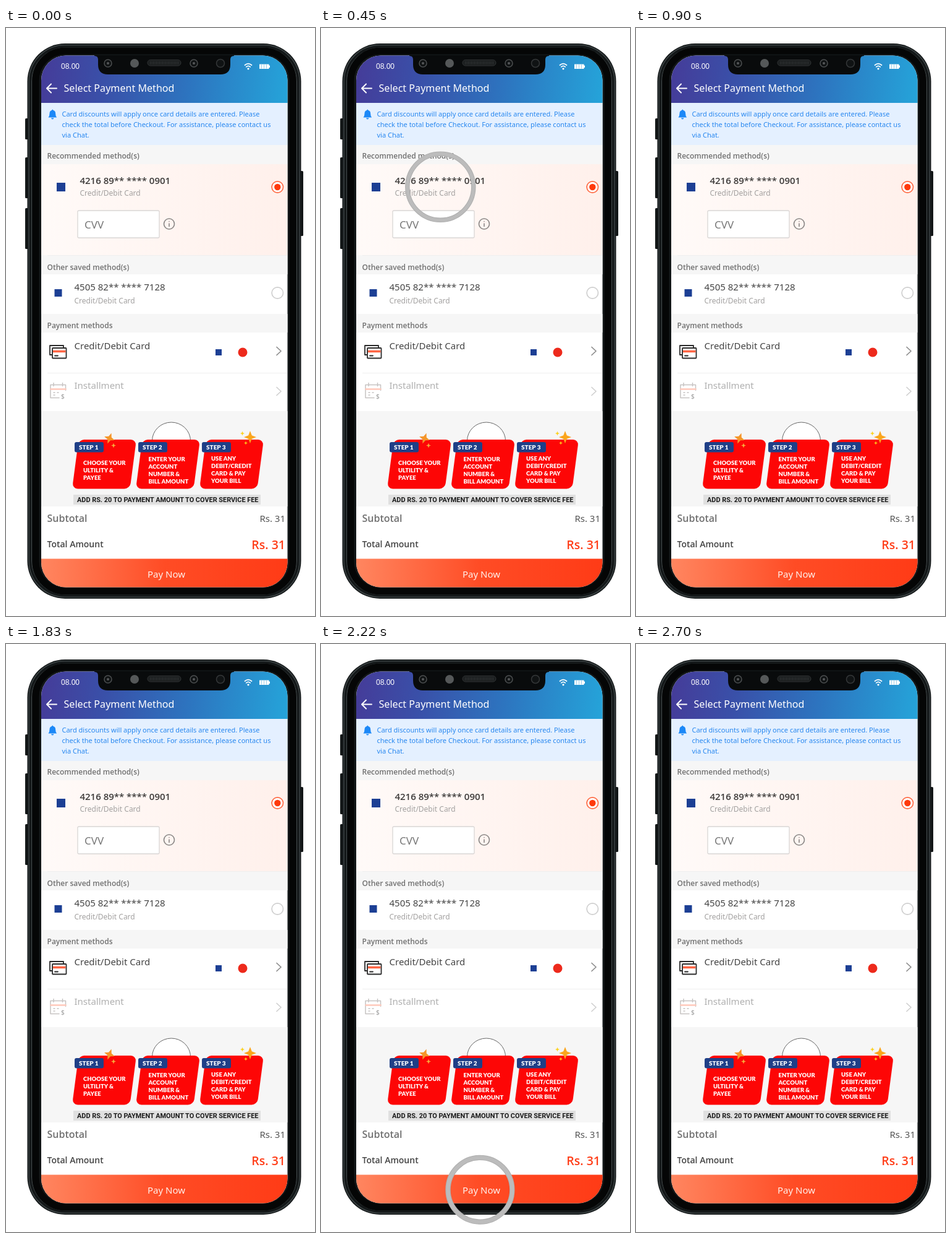
An HTML page that plays this animation: 500x950 px, repeating every 3030 ms.

```html
<!DOCTYPE html>
<html lang="en">
<head>
<meta charset="utf-8">
<title>Select payment method</title>
<style>
  html, body { margin: 0; width: 100%; height: 100%; overflow: hidden; background: #fff; }
  svg { display: block; width: 100%; height: 100%; }
  text { font-family: "Noto Sans", "Open Sans", sans-serif; white-space: pre; }
  .semi { font-family: "Open Sans", "Noto Sans", sans-serif; font-weight: 600; }
  .promo { font-family: Lato, "Open Sans", sans-serif; font-weight: 900; }
  .bar { font-family: Roboto, Lato, sans-serif; font-weight: 700; }
  .clock { font-family: "Liberation Sans", Arial, sans-serif; }
  .end { text-anchor: end; }
  .line { fill: none; stroke-linecap: round; stroke-linejoin: round; }
</style>
</head>
<body>
<svg viewBox="0 0 500 950" xmlns="http://www.w3.org/2000/svg">
  <defs>
    <clipPath id="screen"><rect x="57" y="44.500" width="398.500" height="859" rx="40"/></clipPath>
    <linearGradient id="head" gradientUnits="userSpaceOnUse" x1="57" y1="60" x2="455" y2="105">
      <stop offset="0" stop-color="#453c99"/>
      <stop offset=".25" stop-color="#3a4fa8"/>
      <stop offset=".6" stop-color="#2d74bf"/>
      <stop offset="1" stop-color="#25a3d9"/>
    </linearGradient>
    <linearGradient id="blush">
      <stop offset="0" stop-color="#fffaf8"/>
      <stop offset="1" stop-color="#fff0eb"/>
    </linearGradient>
    <linearGradient id="pay">
      <stop offset="0" stop-color="#ff8660"/>
      <stop offset=".5" stop-color="#ff4c25"/>
      <stop offset="1" stop-color="#ff3b16"/>
    </linearGradient>
  </defs>

  <!-- phone body -->
  <g fill="#131718">
    <rect x="31" y="146" width="6" height="34" rx="1.5"/>
    <rect x="31" y="209" width="6" height="66" rx="1.5"/>
    <rect x="31" y="291" width="6" height="66" rx="1.5"/>
    <rect x="474" y="231" width="7" height="105" rx="1.5"/>
    <rect x="34.500" y="25" width="443" height="897" rx="61"/>
  </g>
  <g fill="none">
    <rect x="37" y="27.500" width="438" height="892" rx="58.500" stroke="#3c4344" stroke-width="1.500"/>
    <rect x="41.500" y="32" width="429" height="883" rx="54" stroke="#434a4b"/>
    <rect x="48" y="37" width="416" height="873" rx="48" stroke="#050606" stroke-width="11"/>
  </g>

  <!-- app screen -->
  <g clip-path="url(#screen)">
    <rect x="57" y="44" width="399" height="860" fill="#fff"/>
    <rect x="57" y="44" width="399" height="77" fill="url(#head)"/>
    <rect x="57" y="121" width="399" height="68" fill="#e4f0ff"/>
    <g fill="#f6f6f6">
      <rect x="57" y="189" width="399" height="31"/>
      <rect x="57" y="367" width="399" height="31"/>
      <rect x="57" y="462" width="399" height="30"/>
      <rect x="57" y="619" width="399" height="154"/>
    </g>
    <rect x="57" y="220" width="399" height="147" fill="url(#blush)"/>
    <path d="M67 367.500H455M67 557.500H455" stroke="#efefef"/>
    <rect x="57" y="857.500" width="399" height="46.500" fill="url(#pay)"/>
  </g>

  <!-- notch -->
  <path d="M143 44v1q6 0 6 6v8q0 16 16 16h182q16 0 16-16v-8q0-6 6-6v-1z" fill="#090b0c"/>
  <g fill="#101314" stroke="#4c4f50" stroke-width="1.500">
    <circle cx="165" cy="57" r="6"/>
    <circle cx="304" cy="57" r="6"/>
    <circle cx="347" cy="57" r="6.500" stroke="#343738"/>
  </g>
  <g fill="#555859">
    <circle cx="165" cy="57" r="2"/>
    <circle cx="304" cy="57" r="2"/>
    <circle cx="208" cy="57" r="7"/>
  </g>
  <rect x="229" y="51.500" width="54" height="9.500" rx="4.750" fill="#1b1e1f" stroke="#303334"/>
  <path d="M233 56.300h46" stroke="#303334" stroke-width="5" stroke-dasharray="1 1.500"/>

  <!-- status bar and header -->
  <g class="line" stroke="#fff" stroke-width="1.700">
    <path d="M386.500 60q5.500-4.600 11 0M388.700 62.800q3.300-2.700 6.600 0"/>
    <path d="M82 97.500H66.500M73 90.500l-7 7 7 7" stroke-width="2"/>
  </g>
  <circle cx="392" cy="65.800" r="1.600" fill="#fff"/>
  <path d="M410 58.500h15.500v2h1.500v3.500h-1.500v2H410z" fill="#fff"/>
  <path d="M413.500 59v6.500M417.500 59v6.500M421.500 59v6.500" stroke="#6db8df" stroke-width=".7"/>

  <!-- bell -->
  <path d="M68.500 144.500q2-2 2-6.500 0-4.500 4-5.300v-1h1.600v1q4 .8 4 5.300 0 4.500 2 6.500zM73 145.500h4.500q-.4 2-2.250 2t-2.250-2z" fill="#1c88f7"/>

  <!-- saved cards -->
  <g fill="#1c3f94">
    <rect x="82" y="250" width="14" height="14"/>
    <rect x="78.500" y="422" width="12" height="12"/>
    <rect x="339" y="519" width="10" height="10"/>
  </g>
  <circle cx="383" cy="524" r="7.500" fill="#ed2a1c"/>
  <rect x="116" y="295" width="132" height="44" rx="2" fill="#fff" stroke="#d9d6d5" stroke-width="1.300"/>
  <g class="line" stroke="#8a8786" stroke-width="1.600">
    <circle cx="264" cy="316.500" r="8.500"/>
    <path d="M264 316v4.500M264 312.500v.1"/>
  </g>
  <circle cx="439.300" cy="257" r="9.200" fill="#fff" stroke="#ff6a43" stroke-width="1.700"/>
  <circle cx="439.300" cy="257" r="5.200" fill="#ff3a0c"/>
  <circle cx="439.300" cy="428" r="9.200" fill="#fff" stroke="#cfcfcf" stroke-width="1.700"/>
  <g class="line" stroke-width="1.700">
    <path d="M438 515.500l7 6.500-7 6.500" stroke="#8c8c8c"/>
    <path d="M438 580.500l7 6.500-7 6.500" stroke="#d0d0d0"/>
  </g>

  <!-- method icons -->
  <g class="line" stroke="#2b2b2b" stroke-width="1.800">
    <path d="M74 528h-3v-15h22v3"/>
    <rect x="75" y="517" width="22.500" height="16.500" rx="1"/>
    <path d="M76 522.500h20.500" stroke="#ff6544" stroke-width="3.500" stroke-linecap="butt"/>
    <path d="M79 529.500h5"/>
  </g>
  <g class="line" stroke="#c6c3c2" stroke-width="1.500">
    <path d="M86 597.500H72v-21h24.500v9"/>
    <path d="M77 573.500v5M91.500 573.500v5"/>
    <path d="M72.500 583.500h24" stroke="#ffc9bb" stroke-width="2.500"/>
    <path d="M77 589h2M83 589h2M77 593h2"/>
  </g>

  <!-- banner -->
  <ellipse cx="267.500" cy="667" rx="31" ry="30" fill="#fff" stroke="#666"/>
  <g id="banner"></g>
  <rect x="109" y="754" width="303" height="16" fill="#e0e0e0"/>
  <g id="labels"></g>

  <g id="ring" fill="none">
    <circle id="edge" stroke="#aeaeae"/>
    <circle id="core" stroke="#bcbcbc"/>
  </g>
</svg>

<script>
const NS = "http://www.w3.org/2000/svg";
const $ = id => document.getElementById(id);

function setAll(el, attrs) {
  for (const key in attrs) el.setAttribute(key, attrs[key]);
}

function add(parent, tag, attrs, content = "") {
  const el = document.createElementNS(NS, tag);
  setAll(el, attrs);
  el.textContent = content;
  parent.append(el);
}

function label(x, y, size, fill, content, cls = "") {
  add($("labels"), "text", { x, y, "font-size": size, fill, class: cls }, content);
}

function star(x, y, r, fill, turn = 0) {
  const q = r * 0.28;
  const d = `M0 ${-r}L${q} ${-q}L${r} 0L${q} ${q}L0 ${r}L${-q} ${q}L${-r} 0L${-q} ${-q}Z`;
  add($("banner"), "path", { d, fill, transform: `translate(${x} ${y}) rotate(${turn})` });
}

// x of the tag, x and first baseline of the copy, lines
const steps = [
  [111, 125, 706, ["CHOOSE YOUR", "ULTILITY &", "PAYEE"]],
  [214, 230.5, 700, ["ENTER YOUR", "ACCOUNT", "NUMBER &", "BILL AMOUNT"]],
  [317, 332, 699, ["USE ANY", "DEBIT/CREDIT", "CARD & PAY", "YOUR BILL"]]
];
steps.forEach(([tag, x, y, lines], i) => {
  const banner = $("banner");
  add(banner, "rect", {
    width: 93.5, height: 79.5, rx: 9, fill: "#fd0606",
    transform: `translate(${tag + 6.5} 665) skewX(-7.5)`
  });
  add(banner, "rect", { x: tag, y: 669, width: 47, height: 16.5, rx: 3, fill: "#1f3f87" });
  label(tag + 7, 681, 10, "#fff", "STEP " + (i + 1), "promo");
  lines.forEach((line, n) => label(x, y + n * 12, 9.5, "#fff", line, "promo"));
});
star(167.5, 663, 9, "#f5962a", 20);
star(174, 674.5, 4, "#f7a93a");
star(395, 661, 10, "#fba51d");
star(382.5, 655, 3.5, "#fcd21c");
star(388, 670.5, 3, "#fcd21c");

const blue = "#2787f0", dark = "#444", grey = "#a3a1a0", band = "#707070";
label(89, 66, 12, "#fff", "08.00", "clock");
label(93.5, 102.5, 16.1, "#fff", "Select Payment Method");
label(90.5, 143, 11, blue, "Card discounts will apply once card details are entered. Please");
label(90.5, 160, 11, blue, "check the total before Checkout. For assistance, please contact us");
label(90.5, 177, 11, blue, "via Chat.");
label(66.5, 211, 12, band, "Recommended method(s)", "semi");
label(119.5, 252, 15, "#3c3a39", "4216 89** **** 0901", "semi");
label(119.5, 271, 12, grey, "Credit/Debit Card");
label(127, 323.5, 17, "#777", "CVV");
label(66.5, 391, 12, band, "Other saved method(s)", "semi");
label(110.5, 424, 15, dark, "4505 82** **** 7128");
label(110.5, 445, 12, grey, "Credit/Debit Card");
label(66.5, 485, 12, band, "Payment methods", "semi");
label(110.5, 519, 15, dark, "Credit/Debit Card");
label(110.5, 583, 15, "#b0b0b0", "Installment");
label(89, 598.5, 10, "#a9a9a9", "$", "semi");
label(115, 766, 10.9, "#1c1c1c", "ADD RS. 20 TO PAYMENT AMOUNT TO COVER SERVICE FEE", "bar");
label(66.5, 798, 16, "#707070", "Subtotal", "semi");
label(452, 798, 15, "#555", "Rs. 31", "end");
label(66.5, 839, 14, dark, "Total Amount", "semi");
label(452, 841.5, 19.5, "#ff3f1a", "Rs. 31", "semi end");
label(229, 888, 15, "#fff1ec", "Pay Now");

const LOOP = 3030, STEP = 30, SPAN = 900;
const taps = [
  { at: 0, cx: 193.3, cy: 256.8 },
  { at: 1800, cx: 257.4, cy: 881.7 }
];

function draw(now) {
  const t = Math.floor((now % LOOP) / STEP) * STEP;
  const tap = taps.find(p => t > p.at + STEP && t < p.at + SPAN);
  $("ring").setAttribute("visibility", tap ? "visible" : "hidden");
  if (!tap) return;
  const { at, cx, cy } = tap;
  const left = 1 - (t - at) / SPAN;
  const outer = 61 * (1 - left ** 4);
  const width = Math.min(outer, 25.8 * left ** 1.8);
  const r = outer - width / 2;
  setAll($("edge"), { cx, cy, r, "stroke-width": width });
  setAll($("core"), { cx, cy, r, "stroke-width": Math.max(0, width - 2) });
}

const start = performance.now();
function tick() {
  draw(performance.now() - start);
  requestAnimationFrame(tick);
}
tick();
</script>
</body>
</html>
```
